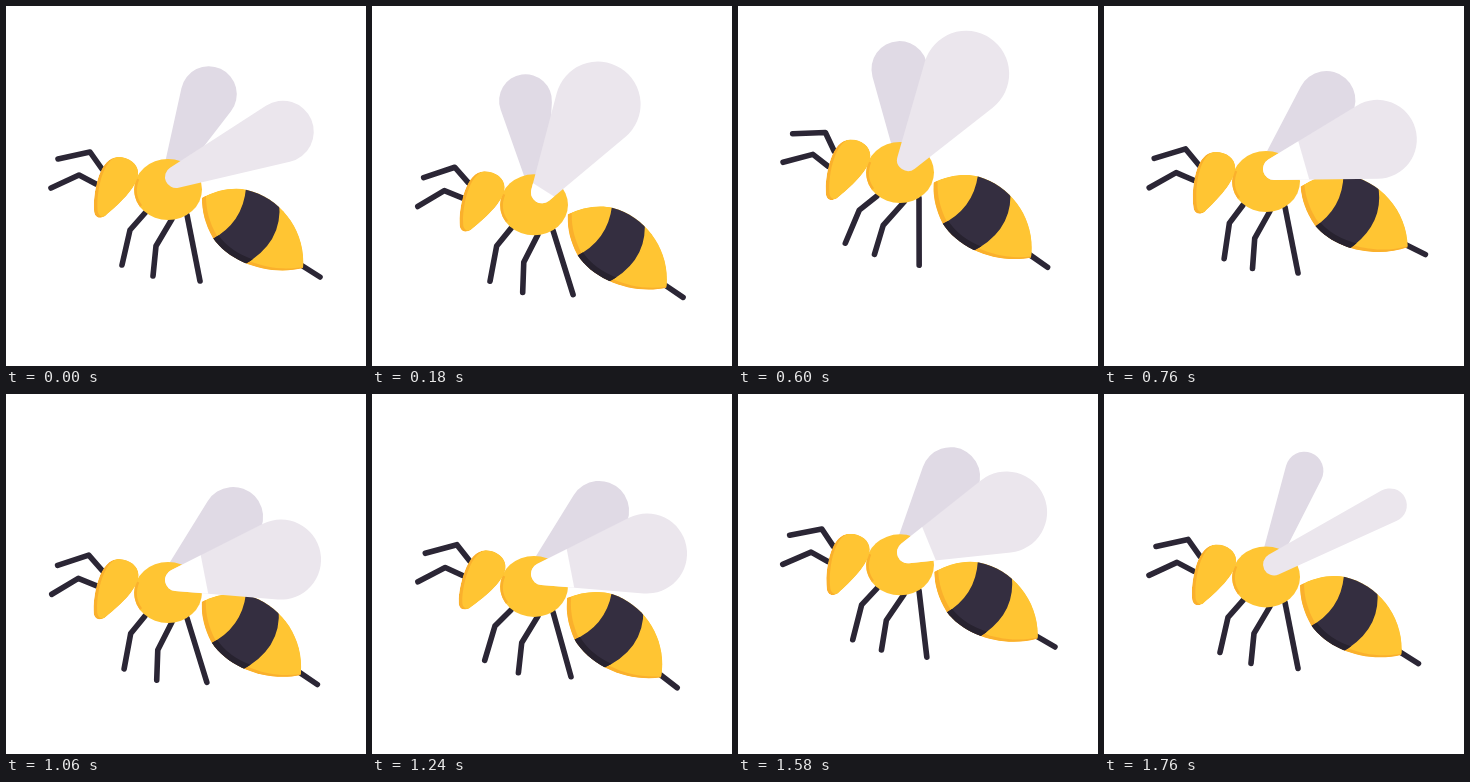
Recreate the animation shown at these times as an HTML page. Size 360 by 360 pixels, loop 1780 ms.

```html
<!DOCTYPE html>
<html lang="en">
<head>
<meta charset="utf-8">
<title>Wasp</title>
<style>
  html, body { margin: 0; width: 100%; height: 100%; overflow: hidden; background: #fff; }
  svg { display: block; width: 100%; height: 100%; }
  .line { fill: none; stroke: #2b2635; stroke-width: 5.6; stroke-linecap: round; stroke-linejoin: round; }
  .yellow { fill: #ffc533; }
  .shade { fill: none; stroke: #fab02c; }
</style>
</head>
<body>
<svg viewBox="0 0 360 360">
  <defs>
    <path id="bellyShape" d="M34 8C48 0 66-3 79 0C113 8 138 41 135 78C103 86 63 74 45 48C37 34 34 21 34 8Z"/>
    <path id="stripeShape" d="M78-2Q75 33 43 50L74 76Q116 53 111 12Z"/>
    <path id="headShape" d="M-50-33C-38-33-29-25-30-16C-31-2-50 15-63 26C-69 30-74 27-74 20C-75 6-70-33-50-33Z"/>
    <clipPath id="bellyClip"><use href="#bellyShape"/></clipPath>
    <clipPath id="stripeClip"><use href="#stripeShape"/></clipPath>
    <clipPath id="headClip"><use href="#headShape"/></clipPath>
    <clipPath id="rootClip"><rect id="root" x="-20" y="-60" width="0" height="120"/></clipPath>
  </defs>
  <!-- origin: centre of the thorax -->
  <g id="body">
    <path id="leg1" class="line" d="M-23 23L-38 40L-46 75"/>
    <path id="leg2" class="line" d="M4 29L-12 56L-15 86"/>
    <path id="leg3" class="line" d="M19 25L32 91"/>
    <path id="backWing" fill="#e0dae5"/>
    <g id="belly">
      <path class="line" d="M133 75L152 87"/>
      <g clip-path="url(#bellyClip)">
        <use href="#bellyShape" class="yellow"/>
        <path class="shade" stroke-width="14" d="M34 6C34 21 37 34 45 48C63 74 103 86 135 78"/>
        <use href="#bellyShape" class="yellow" transform="translate(4 -2)"/>
        <use href="#stripeShape" fill="#342e40"/>
        <g clip-path="url(#stripeClip)">
          <path fill="none" stroke="#27222f" stroke-width="12" d="M34 8C34 21 37 34 45 48C63 74 103 86 135 78"/>
        </g>
      </g>
    </g>
    <g id="head">
      <g id="antenna1"><path class="line" d="M-66-21L-78-38L-110-31"/></g>
      <g id="antenna2"><path class="line" d="M-72-6L-89-15L-117-2"/></g>
    </g>
    <ellipse class="yellow" cy="-.5" rx="34" ry="30.5"/>
    <path class="shade" stroke-width="2.5" d="M-30-11Q-36 4-27 16"/>
    <g id="face" clip-path="url(#headClip)">
      <use href="#headShape" fill="#fab02c"/>
      <use href="#headShape" class="yellow" transform="translate(3.5 -1)"/>
    </g>
    <g id="frontWing">
      <path id="wing" fill="#ebe6ed"/>
      <path id="wingRoot" fill="#fff" clip-path="url(#rootClip)"/>
    </g>
  </g>
</svg>
<script>
const LOOP = 1780, BOB = LOOP / 2, STEP = 20;
const el = id => document.getElementById(id);

// time, height, belly, head, antennae, front leg, middle leg, rear leg
const poses = [
  [0, 184, 0, 0, 0, 0, 0, 0],
  [170, 199, 1.7, 1.1, -7, -2.3, -3.7, -6],
  [235, 200.5, 3.4, 2.6, -8, 0, -3, -7],
  [360, 192, 5.4, 4.3, -7, 4, 1, -4],
  [530, 167, 2.8, .6, 9.5, 10, 11, 11],
  [565, 166.6, 2.8, .6, 9.5, 10, 11, 11],
  [600, 167, 2.8, .6, 9.5, 10, 11, 11],
  [760, 176, -5.3, -3.4, -1, -4.5, -1.5, 0],
  [870, 183.4, -.3, 0, 0, 0, 0, 0]
];

// time, front angle, front tip radius, back angle, back tip radius, white root length
const up = t => [t, 63, 43, 104, 26, 0];
const down = t => [t, 11, 40, 44, 30, 29];
const flaps = [
  [0, 23, 31, 65, 28, 0],
  down(60), up(160), down(260),
  [360, 32, 42, 38, 20, 0],
  up(440), down(520),
  [600, 56, 43, 93, 28, 0],
  up(630), down(740),
  [760, 16, 39.5, 49, 29, 31],
  up(840), down(915), up(985), down(1060),
  up(1150), down(1240), up(1320), down(1375),
  [1420, 34, 41, 111, 19.5, 0],
  up(1460), down(1550), up(1650),
  [1760, 27, 17, 69, 19, 0]
];

// Periodic smooth curve through the keys, without overshoot
function sample(keys, period, t) {
  const n = keys.length;
  const key = (i, c) => {
    const turn = Math.floor(i / n), k = keys[i - turn * n];
    return c ? k[c] : k[0] + turn * period;
  };
  const slope = (i, c) => (key(i + 1, c) - key(i, c)) / (key(i + 1, 0) - key(i, 0));
  const tangent = (i, c) => {
    const a = slope(i - 1, c), b = slope(i, c);
    return a * b > 0 ? 2 * a * b / (a + b) : 0;
  };
  let i = n - 1;
  while (keys[i][0] > t) i--;
  const span = key(i + 1, 0) - key(i, 0), u = (t - key(i, 0)) / span, v = 1 - u;
  return keys[0].slice(1).map((_, j) => {
    const c = j + 1;
    return v * v * (1 + 2 * u) * key(i, c) + u * u * (3 - 2 * u) * key(i + 1, c)
      + span * u * v * (v * tangent(i, c) - u * tangent(i + 1, c));
  });
}

// Outline around a small root circle and a larger tip circle
function wingPath(root, tip, reach) {
  const d = reach - tip, s = (tip - root) / d, c = Math.sqrt(1 - s * s);
  return `M${-root * s} ${-root * c}L${d - tip * s} ${-tip * c}`
    + `A${tip} ${tip} 0 1 1 ${d - tip * s} ${tip * c}`
    + `L${-root * s} ${root * c}A${root} ${root} 0 0 1 ${-root * s} ${-root * c}Z`;
}

const set = (id, name, value) => el(id).setAttribute(name, value);
const turn = (id, angle, x = 0, y = 0) => set(id, "transform", `rotate(${angle} ${x} ${y})`);
const mount = (id, x, y, angle) => set(id, "transform", `translate(${x} ${y}) rotate(${-angle})`);

function draw(now) {
  const t = Math.floor(now % LOOP / STEP) * STEP;
  const [y, belly, head, antenna, leg1, leg2, leg3] = sample(poses, BOB, t % BOB);
  const [frontAngle, frontTip, backAngle, backTip, white] = sample(flaps, LOOP, t);

  set("body", "transform", `translate(162 ${y})`);
  turn("belly", belly);
  turn("head", head);
  turn("face", head);
  turn("antenna1", antenna, -66, -21);
  turn("antenna2", antenna, -72, -6);
  turn("leg1", leg1, -23, 23);
  turn("leg2", leg2, 4, 29);
  turn("leg3", leg3, 19, 25);

  mount("backWing", 4, -17, backAngle);
  set("backWing", "d", wingPath(9, backTip, 115));
  mount("frontWing", 8, -13, frontAngle);
  const shape = wingPath(11, frontTip, 147);
  set("wing", "d", shape);
  set("wingRoot", "d", shape);
  set("root", "width", white > 1 ? white + 20 : 0);
}

function tick() {
  draw(performance.now());
  requestAnimationFrame(tick);
}
tick();
</script>
</body>
</html>
```
